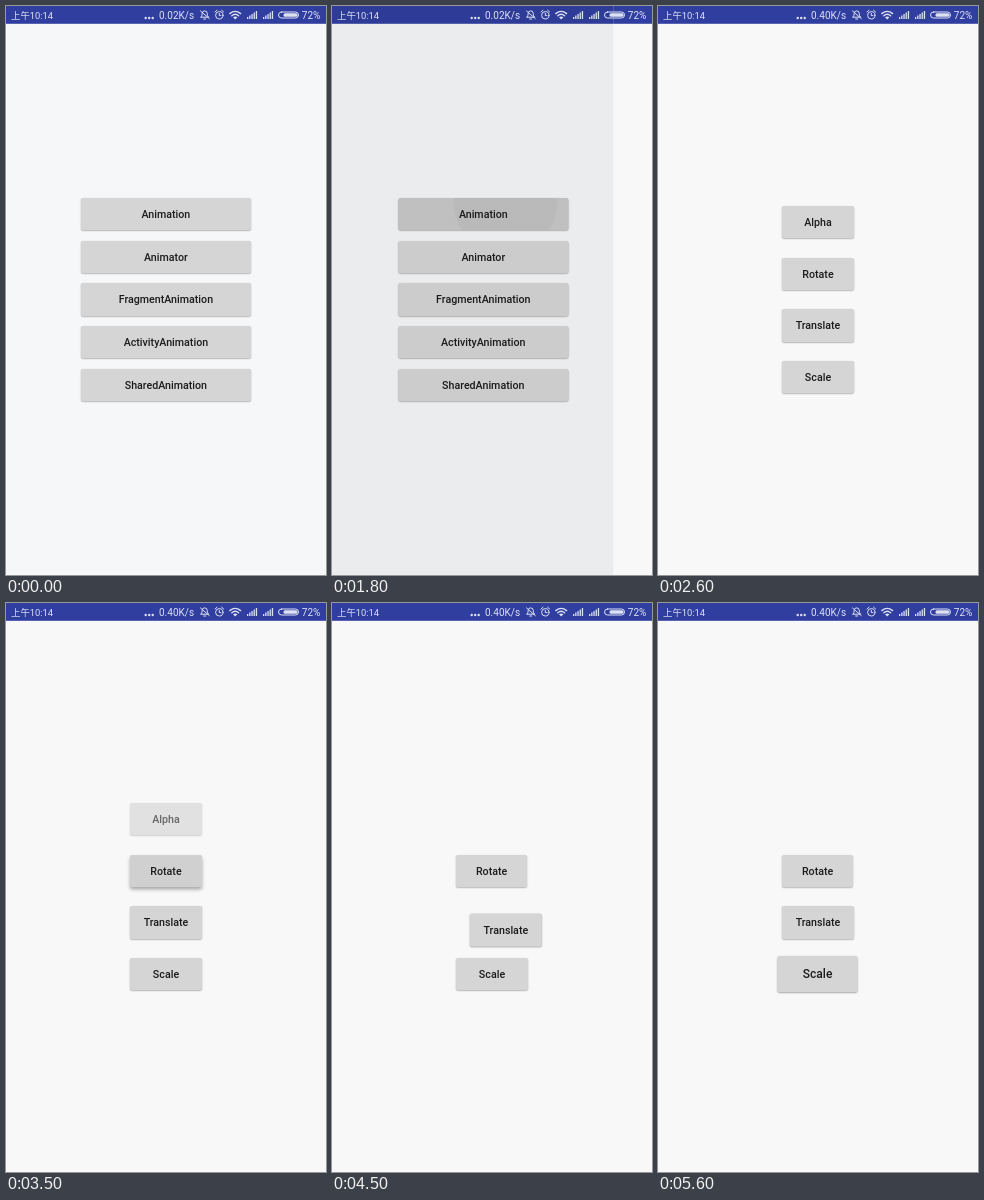
These frames come from a looping animation (320x569 px, 5.7 s). An HTML page:

```html
<!DOCTYPE html>
<html lang="en">
<head>
<meta charset="utf-8">
<title>Button animations</title>
<style>
  html, body { margin: 0; width: 100%; height: 100%; overflow: hidden; background: #f6f7f8; }
  #stage { position: relative; width: 320px; height: 569px; overflow: hidden; }
  .screen, .dim, #status { position: absolute; inset: 0; }
  .screen { background: linear-gradient(#303f9f 17.3px, transparent 18.3px) var(--bg); }
  #home { --bg: #f6f7f8; }
  #detail { --bg: #f8f8f8; }
  .dim { background: #000; }
  .button {
    position: absolute; height: 32.4px; border-radius: 1.8px; background-color: #d5d5d5;
    box-shadow: 0 .8px 1.6px rgba(0, 0, 0, .32);
    font: 500 10.67px/33px Roboto, sans-serif; color: #1c1c1c; text-align: center; white-space: nowrap;
  }
  #home .button { left: 74.6px; width: 170.6px; }
  #detail .button { left: 124.4px; width: 71.2px; }
  #status { width: 320px; height: 18px; fill: #dde1f4; font: 10px Roboto, "Noto Sans CJK SC", "Noto Sans CJK", sans-serif; }
  #status .line { fill: none; stroke: #dde1f4; stroke-linecap: round; }
</style>
</head>
<body>
<div id="stage">
  <div id="home" class="screen"></div>
  <div id="detail" class="screen"></div>
  <svg id="status" viewBox="0 0 320 18">
    <text x="5" y="12.7" font-size="9.4">上午10:14</text>
    <circle cx="139.7" cy="12" r="1.2"/><circle cx="143.2" cy="12" r="1.2"/><circle cx="146.7" cy="12" r="1.2"/>
    <text id="speed" x="153" y="12.8"></text>
    <path class="line" d="M195 11.2h7.6q-1.4-1.2-1.4-3.8a2.5 2.5 0 0 0-5 0q0 2.6-1.2 3.8M197.7 13h2M194.5 5l8.8 7.6"/>
    <g class="line"><circle cx="213.3" cy="9.3" r="3.7"/><path d="M213.3 7.3v2.3h1.6M209 6l2-1.8M217.6 6l-2-1.8"/></g>
    <path class="line" stroke-width="1.4" d="M223.8 7.6q5.4-4.4 10.8 0M225.8 9.7q3.4-2.8 6.8 0"/>
    <path d="M227 11.2q2.2-1.5 4.4 0l-2.2 2.3z"/>
    <path id="bars" d=""/>
    <rect class="line" x="272.5" y="6" width="20" height="6" rx="3"/>
    <rect x="277.5" y="7.2" width="14" height="3.6" rx="1.6"/>
    <text x="295.8" y="12.8">72%</text>
  </svg>
</div>
<script>
const LOOP = 5700;
const $ = id => document.getElementById(id);
const clamp = v => Math.min(1, Math.max(0, v));
const progress = (t, start, length) => clamp((t - start) / length);
const smooth = p => (1 - Math.cos(Math.PI * p)) / 2;

function addButtons(screen, labels, spacing) {
  return labels.map((label, i) => {
    const button = document.createElement('div');
    button.className = 'button';
    button.textContent = label;
    button.style.top = 293.6 + spacing * (i - (labels.length - 1) / 2) - 16.2 + 'px';
    screen.append(button);
    return button;
  });
}

const home = $('home'), detail = $('detail');
const [first] = addButtons(home,
  ['Animation', 'Animator', 'FragmentAnimation', 'ActivityAnimation', 'SharedAnimation'], 42.67);
const [alpha, rotate, translate, scale] = addButtons(detail,
  ['Alpha', 'Rotate', 'Translate', 'Scale'], 51.56);
const dim = document.createElement('div');
dim.className = 'dim';
home.append(dim);

let bars = '';
for (const x of [241, 257])
  for (let i = 0; i < 5; i++) bars += `M${x + i * 2.2} 13v${-2 - i * 1.5}h1.3V13z`;
$('bars').setAttribute('d', bars);

// Raises and darkens a button while a finger is on it.
function press(button, t, down, up) {
  const k = progress(t, down, 80) * (1 - progress(t, up, 100));
  button.style.boxShadow = `0 ${.8 + 1.7 * k}px ${1.6 + 2.2 * k}px rgba(0,0,0,.32)`;
  const grey = 213 - 5 * k;
  button.style.backgroundColor = `rgb(${grey},${grey},${grey})`;
}

function ripple(t) {
  const shade = .06 * progress(t, 1650, 100);
  const spot = .035 * progress(t, 1650, 50);
  const r = 51 * Math.min(1.15, Math.max(0, (t - 1650) / 150));
  first.style.backgroundImage =
    `radial-gradient(circle at 107px 4px, rgba(0,0,0,${spot}) ${r}px, transparent ${r + .7}px),` +
    `linear-gradient(rgba(0,0,0,${shade}), rgba(0,0,0,${shade}))`;
}

function draw(t) {
  const slide = 1 - (1 - progress(t, 1786.5, 344)) ** 3;
  home.style.transform = `translateX(${-71 * slide}px)`;
  detail.style.transform = `translateX(${320 * (1 - slide)}px)`;
  detail.style.visibility = slide ? 'visible' : 'hidden';
  dim.style.opacity = .36 * slide;
  ripple(t);
  $('speed').textContent = t < 2600 ? '0.02K/s' : '0.40K/s';

  press(alpha, t, 3060, 3160);
  press(rotate, t, 3400, 3500);
  press(translate, t, 4150, 4250);
  press(scale, t, 4820, 5180);

  alpha.style.opacity = 1 - smooth(progress(t, 3100, 1000));
  rotate.style.transform = `rotate(${360 * smooth(progress(t, 3505, 1000))}deg)`;
  const move = t < 5250 ? 1.2 * smooth(progress(t, 4250, 1000)) : 0;
  translate.style.transform = `translate(${78.2 * move}px, ${42.7 * move}px)`;
  scale.style.transform = `scale(${1 + .5 * smooth(progress(t, 5265, 1000))})`;
}

function tick() {
  draw(performance.now() % LOOP);
  requestAnimationFrame(tick);
}
tick();
</script>
</body>
</html>
```
